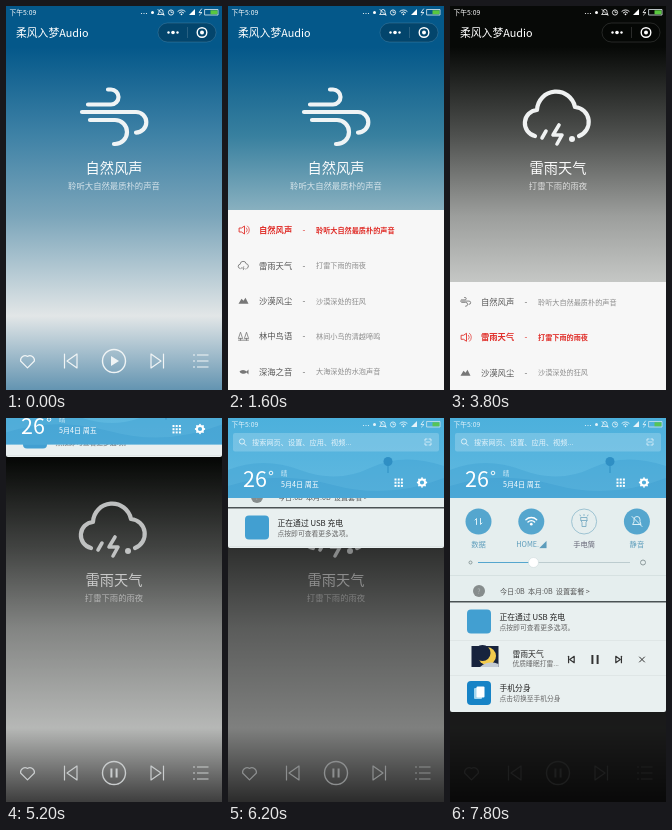
Recreate the animation shown at these times as an HTML page with a canvas. Size 216 px wide and 384 px high, loop 8000 ms.

```html
<!DOCTYPE html>
<html lang="zh-CN">
<head>
<meta charset="utf-8">
<title>Sleep sounds</title>
<style>
html, body { margin: 0; width: 100%; height: 100%; overflow: hidden; background: #000; }
canvas { display: block; width: 216px; height: 384px; }
</style>
</head>
<body>
<canvas id="stage"></canvas>
<script>
const W = 216, H = 384, LOOP = 8000, STEP = 200;
const canvas = document.getElementById('stage');
const ctx = canvas.getContext('2d');
const ratio = window.devicePixelRatio || 1;
canvas.width = W * ratio;
canvas.height = H * ratio;

const FONT = '"Noto Sans CJK SC", "Noto Sans CJK", "Noto Sans", sans-serif';
const RED = '#e02f2a', BLUE = '#429fd1';

const SOUNDS = [
  ['自然风声', '聆听大自然最质朴的声音'],
  ['雷雨天气', '打雷下雨的雨夜'],
  ['沙漠风尘', '沙漠深处的狂风'],
  ['林中鸟语', '林间小鸟的清越啼鸣'],
  ['深海之音', '大海深处的水泡声音']
];

// Sky colours at the heights in SKY_Y, keyed by time
const SKY_Y = [41, 130, 210, 310, 384];
const SKY = [
  [0, ['#04588a', '#3f82a6', '#7ba5ba', '#e2e6e7', '#6394b1']],
  [1000, ['#04588a', '#38809f', '#8fb4c2', '#e0e8ea', '#6394b1']],
  [1800, ['#04588a', '#38809f', '#8fb4c2', '#e0e8ea', '#6394b1']],
  [2600, ['#052d3f', '#3c5965', '#929fa4', '#c4cccf', '#4d646e']],
  [3800, ['#070907', '#4f514f', '#9c9e9c', '#dadcda', '#4a4a4a']]
];

const WIND = 'M82 98.5H105a7.5 7.5 0 0 0 0-15H102M76 106H130a10.3 10.3 0 0 1 0 20.6M84 114H109a12 12 0 0 1 0 24H108';
const CLOUD = 'M85 130a13.2 13.2 0 0 1 2-26a19.2 19.2 0 0 1 38-3a15 15 0 0 1 4 29';
const BOLT = 'M96 125L92 132M109 119L103 129H112L107 138';
const HEART = 'M0 6L-6 0A4 4 0 0 1 0-4A4 4 0 0 1 6 0Z';

const clamp = v => Math.max(0, Math.min(1, v));
const easeOut = v => 1 - (1 - clamp(v)) ** 2;

function mix(a, b, k) {
  const channel = (hex, i) => parseInt(hex.slice(i, i + 2), 16);
  return `rgb(${[1, 3, 5].map(i => Math.round(channel(a, i) + (channel(b, i) - channel(a, i)) * k))})`;
}

function text(str, x, y, size, color = '#fff', align = 'left', weight = 400) {
  ctx.font = `${weight} ${size}px ${FONT}`;
  ctx.textAlign = align;
  ctx.textBaseline = 'middle';
  ctx.fillStyle = color;
  ctx.fillText(str, x, y);
}

function rect(x, y, w, h, color, radius = 0) {
  ctx.fillStyle = color;
  ctx.beginPath();
  ctx.roundRect(x, y, w, h, radius);
  ctx.fill();
}

function disc(x, y, r, color) {
  ctx.fillStyle = color;
  ctx.beginPath();
  ctx.arc(x, y, r, 0, 7);
  ctx.fill();
}

function ring(x, y, r, color, width = 1) {
  ctx.strokeStyle = color;
  ctx.lineWidth = width;
  ctx.beginPath();
  ctx.arc(x, y, r, 0, 7);
  ctx.stroke();
}

function path(d, color, { x = 0, y = 0, scale = 1, width = 1, fill = false } = {}) {
  ctx.save();
  ctx.translate(x, y);
  ctx.scale(scale, scale);
  ctx.lineCap = ctx.lineJoin = 'round';
  ctx.lineWidth = width / scale;
  ctx.strokeStyle = ctx.fillStyle = color;
  ctx[fill ? 'fill' : 'stroke'](new Path2D(d));
  ctx.restore();
}

function wifi(x, y, scale, color) {
  path('M-6-2A8.5 8.5 0 0 1 6-2M-3.7 0.5A5.2 5.2 0 0 1 3.7 0.5', color, { x, y, scale, width: 1.5 * scale });
  disc(x, y + 3 * scale, 1.5 * scale, color);
}

function statusBar() {
  text('下午5:09', 3.5, 6.5, 6.8);
  for (const x of [135.5, 138, 140.5]) disc(x, 7.5, 0.6, '#fff');
  disc(146.5, 6.5, 1.5, '#fff');
  path('M-3 2H3L2 0V-1A2 2 0 0 0-2-1V0ZM-3-3L3 3', '#fff', { x: 155, y: 6.5, width: 0.8 });
  ring(165, 6.5, 2.6, '#fff', 0.8);
  path('M0-1.5V0H1.3', '#fff', { x: 165, y: 6.5, width: 0.7 });
  wifi(175.5, 6.5, 0.6, '#fff');
  path('M-3 3H3V-3Z', '#fff', { x: 186, y: 6, fill: true });
  path('M1-3L-1.5 0.5H1.5L-1 3', '#fff', { x: 194.5, y: 6, width: 0.8 });
  path('M199 3.5H212V9H199Z', '#e4eef2', { width: 0.8 });
  rect(204.5, 4.3, 7, 4, '#59c83f');
}

function sky(t) {
  let i = SKY.length - 1;
  while (SKY[i][0] > t) i--;
  const [from, a] = SKY[i], [to, b] = SKY[i + 1] || [from + 1, a];
  const k = clamp((t - from) / (to - from));
  const gradient = ctx.createLinearGradient(0, 0, 0, H);
  SKY_Y.forEach((y, n) => gradient.addColorStop(y / H, mix(a[n], b[n], k)));
  ctx.fillStyle = gradient;
  ctx.fillRect(0, 0, W, H);
}

function header() {
  statusBar();
  text('柔风入梦Audio', 10, 27, 10.8);
  rect(152, 17, 58, 19, 'rgba(0,0,0,.22)', 9.5);
  ctx.strokeStyle = 'rgba(255,255,255,.18)';
  ctx.lineWidth = 0.7;
  ctx.stroke();
  [162.5, 167, 171.5].forEach((x, i) => disc(x, 26.5, i === 1 ? 1.8 : 1.2, '#fff'));
  rect(181, 21, 0.6, 11, 'rgba(255,255,255,.25)');
  ring(196, 26.5, 4.8, '#fff', 1.4);
  disc(196, 26.5, 2, '#fff');
}

function soundIcon(index, color, width) {
  if (index === 0) return path(WIND, color, { width });
  path(CLOUD, color, { width });
  path(BOLT, color, { width: width * 0.85 });
  disc(122, 133, 3, color);
}

function hero(index, alpha) {
  ctx.globalAlpha = alpha;
  soundIcon(index, '#f7f9f9', 4.2);
  text(SOUNDS[index][0], 108, 161.5, 14.2, '#fff', 'center');
  ctx.globalAlpha = alpha * 0.75;
  text(SOUNDS[index][1], 108, 180, 8.35, '#fff', 'center');
  ctx.globalAlpha = 1;
}

function pauseBars(x, y, h, color) {
  rect(x - 3.6, y - h / 2, 2, h, color);
  rect(x + 1.6, y - h / 2, 2, h, color);
}

function skip(x, y, dir, scale, color) {
  path(dir < 0 ? 'M6-7V7L-4 0Z' : 'M-6-7V7L4 0Z', color, { x, y, scale, width: 1.2 });
  path('M0-7V7', color, { x: x + dir * 6.5 * scale, y, scale, width: 1.2 });
}

function controls(playing) {
  const color = '#f0f4f5', y = 355;
  path(HEART, color, { x: 21.5, y, scale: 1.15, width: 1.2 });
  skip(65, y, -1, 1, color);
  ring(108, y, 11.5, color, 1.4);
  if (playing) pauseBars(108, y, 9, color);
  else path('M-3-5V5L5 0Z', color, { x: 108, y, fill: true });
  skip(151, y, 1, 1, color);
  for (const dy of [-6, 0, 6]) {
    rect(187, y + dy - 0.5, 2, 1, color);
    rect(191, y + dy - 0.5, 11.5, 1, color);
  }
}

function listIcon(index, selected, y) {
  const color = '#777', at = { x: 15.5, y };
  if (selected) {
    path('M-4-2H-2L1-4V4L-2 2H-4Z', RED, { ...at, width: 0.9 });
    path('M3-2A3 3 0 0 1 3 2M4-4A5 5 0 0 1 4 4', RED, { ...at, width: 0.7 });
  } else if (index < 2) {
    ctx.save();
    ctx.translate(15.5, y);
    ctx.scale(0.16, 0.16);
    ctx.translate(-108, -111);
    soundIcon(index, color, 5.5);
    ctx.restore();
  } else if (index === 2) {
    path('M-5 3L-2-2L0 0L2-3L5 3Z', color, { ...at, fill: true });
  } else if (index === 3) {
    path('M-5 2L-3-4L-1 2ZM1 2L3-4L5 2ZM-3 2V4M3 2V4M-5 4H5', color, { ...at, width: 0.8 });
  } else {
    path('M-4 0A4 3 0 0 1 3 0L5-2V3L3 1A4 3 0 0 1-4 0M-3-4L-1-2M2-4L1-2', color, { ...at, fill: true });
  }
}

function soundList(top, current) {
  rect(0, top, W, H, '#f7f7f7');
  SOUNDS.forEach(([name, note], i) => {
    const y = top + 20 + i * 35.4, selected = i === current, weight = selected ? 700 : 400;
    listIcon(i, selected, y);
    text(name, 31, y, 8.3, selected ? RED : '#555', 'left', weight);
    text('-', 74.5, y, 8.3, selected ? RED : '#666');
    text(note, 88, y, 7.15, selected ? RED : '#8c8c8c', 'left', weight);
  });
}

function quickSettings() {
  rect(0, 60, W, 123, '#e5eeee');
  const labels = ['数据', 'HOME.◢', '手电筒', '静音'];
  labels.forEach((label, i) => {
    const x = 28.5 + i * 52.8;
    if (i === 2) ring(x, 103.5, 12.5, '#8bb8cb', 0.8);
    else disc(x, 103.5, 13, '#55a6ce');
    text(label, x, 126, 7.3, i === 2 ? '#667' : '#5c9cbb', 'center');
  });
  path('M-2 3V-3L-3.5-1.5M2-3V3L3.5 1.5', '#dcf0f7', { x: 28.5, y: 103.5 });
  wifi(81.3, 103.5, 0.9, '#fff');
  path('M-3-4H3V-1L2 1V5H-2V1L-3-1ZM-3-1H3M0-7V-6M-4-6.5L-3.5-5.5M4-6.5L3.5-5.5', '#7badc4', { x: 134, y: 103.5, width: 0.9 });
  path('M-4 3H4L3 0V-2A3 3 0 0 0-3-2V0ZM-5-5L5 5', '#dcf0f7', { x: 187, y: 103.5 });
  rect(28, 144, 152, 1, '#bccccf');
  rect(28, 144, 55, 1, '#55a6ce');
  ring(20.5, 144.5, 1.5, '#8c9a9c');
  ring(193, 144.5, 2.5, '#8c9a9c');
  disc(83.5, 144.5, 5, '#fff');
  ring(83.5, 144.5, 5, '#c9d6d8', 0.5);
  rect(0, 157, W, 0.7, '#d2dcdc');
  disc(29, 173, 6, '#868c8c');
  text('?', 29, 173, 7, '#b5bcbc', 'center');
  text('今日:0B  本月:0B  设置套餐 >', 50, 173, 7.1, '#555');
}

function notice(title, note, x, y) {
  text(title, x, y, 7.8, '#222', 'left', 500);
  text(note, x, y + 9.8, 6.8, '#666');
}

function notifications(bottom, shift) {
  rect(0, 184.5, W, bottom - shift - 184.5, '#e9f0f0', [0, 0, 2, 2]);
  rect(17, 191.5, 24, 24, BLUE, 4);
  notice('正在通过 USB 充电', '点按即可查看更多选项。', 49.5, 199.5);
  rect(0, 222, W, 0.6, '#d5dede');
  rect(21.5, 228, 27, 21, '#17233d');
  disc(37, 238, 9, '#f3cb4c');
  disc(32.5, 235, 8, '#17233d');
  path('M30 249Q38 242 48.5 246V249Z', '#c3cbd4', { fill: true });
  notice('雷雨天气', '优质睡眠打雷...', 62.5, 236);
  skip(121.5, 241.5, -1, 0.45, '#333');
  pauseBars(145, 241.5, 9, '#333');
  skip(168.5, 241.5, 1, 0.45, '#333');
  path('M-2.5-2.5L2.5 2.5M2.5-2.5L-2.5 2.5', '#333', { x: 192, y: 241.5 });
  rect(0, 257, W, 0.6, '#d5dede');
  rect(17, 263, 24, 24, '#1783c6', 4);
  rect(24, 270, 8, 11, '#a5d6ee', 1);
  rect(26.5, 268.5, 8, 11, '#fff', 1);
  notice('手机分身', '点击切换至手机分身', 49.5, 270.5);
}

function weather() {
  const gradient = ctx.createLinearGradient(0, 0, 0, 80);
  gradient.addColorStop(0, '#4cb0dc');
  gradient.addColorStop(1, '#62b9e0');
  ctx.fillStyle = gradient;
  ctx.fillRect(0, 0, W, 80);
  path('M0 52Q35 38 72 52T142 50T216 48V80H0Z', 'rgba(45,145,199,.25)', { fill: true });
  path('M0 68Q50 52 105 67T216 60V80H0Z', 'rgba(45,145,199,.25)', { fill: true });
  disc(160, 43.5, 4.5, '#2f8fc4');
  rect(159.5, 43, 1, 12, '#2f8fc4');
  ctx.globalAlpha = 0.85;
  statusBar();
  ctx.globalAlpha = 1;
  rect(5, 15, 206, 18.5, 'rgba(255,255,255,.2)', 2);
  ring(14, 23.5, 2.6, '#e4f3fa', 0.9);
  path('M16 25.5L18 27.5', '#e4f3fa');
  text('搜索网页、设置、应用、视频...', 24, 24, 7.2, '#e4f3fa');
  path('M-3-1V-3H-1M1-3H3V-1M3 1V3H1M-1 3H-3V1M-2 0H2', '#e4f3fa', { x: 200, y: 24, width: 0.8 });
  text('26', 15, 61, 21.5, '#fff', 'left', 300);
  ring(43, 55, 1.8, '#fff', 0.9);
  text('晴', 53, 55.5, 6.3, '#d8eef8');
  text('5月4日 周五', 53, 66, 7.1);
  for (let i = 0; i < 9; i++) rect(166.5 + i % 3 * 3.2, 60.5 + Math.floor(i / 3) * 3.2, 2, 2, '#fff');
  ring(194, 64.5, 3.1, '#fff', 2);
  for (let i = 0; i < 8; i++) {
    const a = i * Math.PI / 4;
    disc(194 + 4.3 * Math.cos(a), 64.5 + 4.3 * Math.sin(a), 0.9, '#fff');
  }
}

function shade(t) {
  if (t < 5000) return;
  const bottom = t < 6200 ? 39 + (t - 5200) * 0.091 : 130 + (t - 6200) * 0.1025;
  const shift = t < 6200 ? bottom - 224 : -94 * (1 - (t - 6200) / 1600);
  rect(0, 0, W, H, `rgba(0,0,0,${clamp(0.42 + (bottom - 130) * 0.0028)})`);
  ctx.save();
  ctx.beginPath();
  ctx.rect(0, 0, W, bottom);
  ctx.clip();
  ctx.translate(0, shift);
  rect(0, 60, W, 130, '#4b5254');
  quickSettings();
  notifications(bottom, shift);
  ctx.restore();
  ctx.save();
  ctx.translate(0, Math.min(0, -80 + bottom * 0.68));
  weather();
  ctx.restore();
}

function draw(t) {
  ctx.setTransform(ratio, 0, 0, ratio, 0, 0);
  const current = t < 1800 ? 0 : 1;
  const open = easeOut((t - 610) / 800) - easeOut((t - 3620) / 800);
  sky(t);
  header();
  hero(current, t < 4600 ? 0.96 : 0.9);
  controls(current === 1);
  if (open > 0) soundList(H - 180 * open, current);
  shade(t);
}

const start = performance.now();
function tick() {
  const t = (performance.now() - start) % LOOP;
  draw(Math.floor(t / STEP) * STEP);
  requestAnimationFrame(tick);
}
tick();
</script>
</body>
</html>
```
